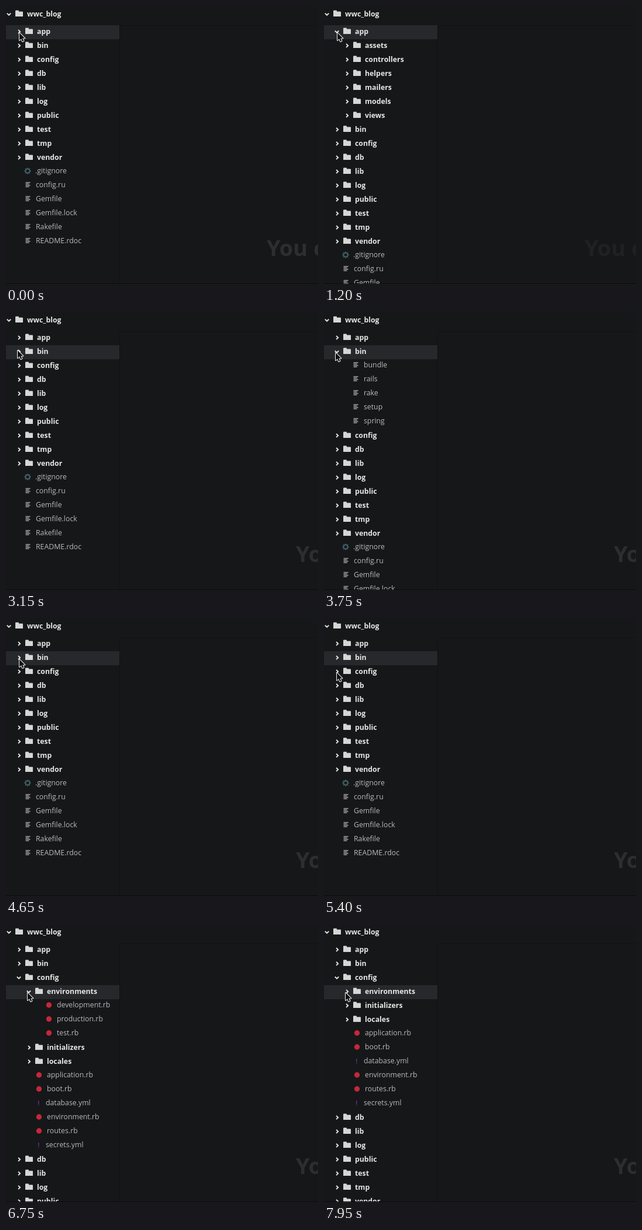
An HTML page with a canvas for the animation above (8000 ms loop, 534 by 477 pixels).

```html
<!DOCTYPE html>
<html lang="en">
<head>
<meta charset="utf-8">
<title>Project tree</title>
<style>
html, body { margin: 0; width: 100%; height: 100%; overflow: hidden; background: #161719; }
canvas { display: block; }
</style>
</head>
<body>
<canvas id="stage" width="534" height="477"></canvas>
<script>
const ctx = document.getElementById('stage').getContext('2d');
const LOOP = 8000, STEP = 150, ROW = 24, INDENT = 17;
const BOLD = 'bold 12.3px "Open Sans", sans-serif';
const PLAIN = '500 12.3px "Open Sans", sans-serif';
const BRIGHT = '#e6e6e6', DIM = '#b8babd', EDGE = '#111214';

const tree = {
  app: { assets: {}, controllers: {}, helpers: {}, mailers: {}, models: {}, views: {} },
  bin: { bundle: 0, rails: 0, rake: 0, setup: 0, spring: 0 },
  config: {
    environments: { 'development.rb': 0, 'production.rb': 0, 'test.rb': 0 },
    initializers: {}, locales: {},
    'application.rb': 0, 'boot.rb': 0, 'database.yml': 0,
    'environment.rb': 0, 'routes.rb': 0, 'secrets.yml': 0
  },
  db: {}, lib: {}, log: {}, public: {}, test: {}, tmp: {}, vendor: {},
  '.gitignore': 0, 'config.ru': 0, Gemfile: 0, 'Gemfile.lock': 0, Rakefile: 0, 'README.rdoc': 0
};

// When each folder is expanded, and when each row becomes selected
const expanded = { app: [150, 1500], bin: [3300, 4650], config: [5700, LOOP], environments: [6750, 7950] };
const selections = [[0, 'app'], [3150, 'bin'], [5550, 'config'], [6600, 'environments']];

// Pointer tip: time, x, y
const pointerPath = [
  [0, 23, 46], [1500, 23, 46], [1800, 21, 53], [1950, 21, 53], [2400, 20, 60], [3000, 20, 66],
  [3600, 20, 66], [3750, 20, 70], [3900, 40, 88], [4050, 30, 79], [4200, 23, 71],
  [4800, 23, 71], [5400, 22, 94], [6000, 22, 94], [6600, 37, 118], [LOOP, 37, 118]
];

const folderShape = new Path2D('M0 1Q0 0 1 0H5Q6 0 6 1V2H12Q13 2 13 3V10.5H0Z');
const pointerShape = new Path2D('M0 0V13L3 10.3L5.2 15L7.4 14L5.3 9.5H9.3Z');
const clamp = v => Math.max(0, Math.min(1, v));

function rect(x, y, w, h, color) {
  ctx.fillStyle = color;
  ctx.fillRect(x, y, w, h);
}

function text(str, x, y, font, color) {
  ctx.font = font;
  ctx.fillStyle = color;
  ctx.fillText(str, x, y);
}

function circle(x, y, r) {
  ctx.beginPath();
  ctx.arc(x, y, r, 0, Math.PI * 2);
}

function shape(path, x, y, fill, stroke) {
  ctx.save();
  ctx.translate(x, y);
  if (stroke) {
    ctx.strokeStyle = stroke;
    ctx.lineWidth = 2;
    ctx.lineJoin = 'round';
    ctx.stroke(path);
  }
  ctx.fillStyle = fill;
  ctx.fill(path);
  ctx.restore();
}

function chevron(x, y, open) {
  ctx.beginPath();
  if (open) {
    ctx.moveTo(x - 3.2, y - 1.5);
    ctx.lineTo(x, y + 1.7);
    ctx.lineTo(x + 3.2, y - 1.5);
  } else {
    ctx.moveTo(x - 2, y - 3);
    ctx.lineTo(x + 1.2, y);
    ctx.lineTo(x - 2, y + 3);
  }
  ctx.strokeStyle = BRIGHT;
  ctx.lineWidth = 1.8;
  ctx.stroke();
}

function gear(x, y) {
  ctx.strokeStyle = '#416069';
  ctx.lineWidth = 2;
  circle(x, y, 3.5);
  ctx.stroke();
  for (let i = 0; i < 8; i++) {
    const a = i * Math.PI / 4, c = Math.cos(a), s = Math.sin(a);
    ctx.beginPath();
    ctx.moveTo(x + c * 4, y + s * 4);
    ctx.lineTo(x + c * 5.6, y + s * 5.6);
    ctx.stroke();
  }
}

function drawFolder(name, x, y, open) {
  chevron(x + (open ? 22 : 23), y, open);
  shape(folderShape, x + 33, y - 6.5, '#d6d6d6');
  text(name, x + 53, y + 4, BOLD, BRIGHT);
}

function drawFile(name, x, y) {
  let left = 51;
  if (name === '.gitignore') {
    gear(x + 37, y);
    left = 50;
  } else if (name.endsWith('.rb')) {
    ctx.fillStyle = '#c3283b';
    circle(x + 39.5, y, 4.7);
    ctx.fill();
    left = 53;
  } else if (name.endsWith('.yml')) {
    rect(x + 38, y - 4, 1.5, 6, '#69288c');
    rect(x + 38, y + 3, 1.5, 1.5, '#69288c');
  } else {
    [8, 6, 8, 6].forEach((w, i) => rect(x + 33.5, y - 4.7 + i * 2.4, w, 1.2, '#c6c7c9'));
  }
  text(name, x + left, y + 4, PLAIN, DIM);
}

function drawTree(t) {
  const selected = selections.filter(s => s[0] <= t).pop()[1];
  let row = 0;
  const visit = (nodes, level) => {
    for (const [name, children] of Object.entries(nodes)) {
      const x = level * INDENT, y = 44 + ROW * row++;
      if (name === selected) rect(0, y - 11, 194, ROW, '#27282c');
      if (!children) {
        drawFile(name, x, y - 1);
        continue;
      }
      const span = expanded[name];
      const open = Boolean(span) && t >= span[0] && t < span[1];
      drawFolder(name, x, y, open);
      if (open) visit(children, level + 1);
    }
  };
  visit(tree, 0);
}

function drawTip(t) {
  const first = t < 1400;
  ctx.globalAlpha = clamp(first ? (1290 - t) / 200 : (t - 1400) / 350);
  text('You can', first ? 446 : 496, 429, 'bold 38px "Open Sans", sans-serif', '#2d2e30');
  ctx.globalAlpha = 1;
}

function drawPointer(t) {
  const i = pointerPath.findIndex(p => p[0] > t);
  const [t0, x0, y0] = pointerPath[i - 1], [t1, x1, y1] = pointerPath[i];
  const k = (t - t0) / (t1 - t0);
  shape(pointerShape, x0 + (x1 - x0) * k, y0 + (y1 - y0) * k, '#101010', '#f2f2f2');
}

function draw(now) {
  const t = Math.floor(now % LOOP / STEP) * STEP;
  rect(0, 0, 534, 477, '#161719');
  rect(194, 33, 1, 443, EDGE);
  rect(194, 33, 340, 1, EDGE);
  drawTip(t);
  chevron(5, 14, true);
  shape(folderShape, 16, 7.5, '#d6d6d6');
  text('wwc_blog', 36, 18, BOLD, BRIGHT);
  drawTree(t);
  rect(0, 476, 534, 1, '#0b0b0c');
  drawPointer(t);
}

const start = performance.now();
function tick() {
  draw(performance.now() - start);
  requestAnimationFrame(tick);
}
tick();
</script>
</body>
</html>
```
